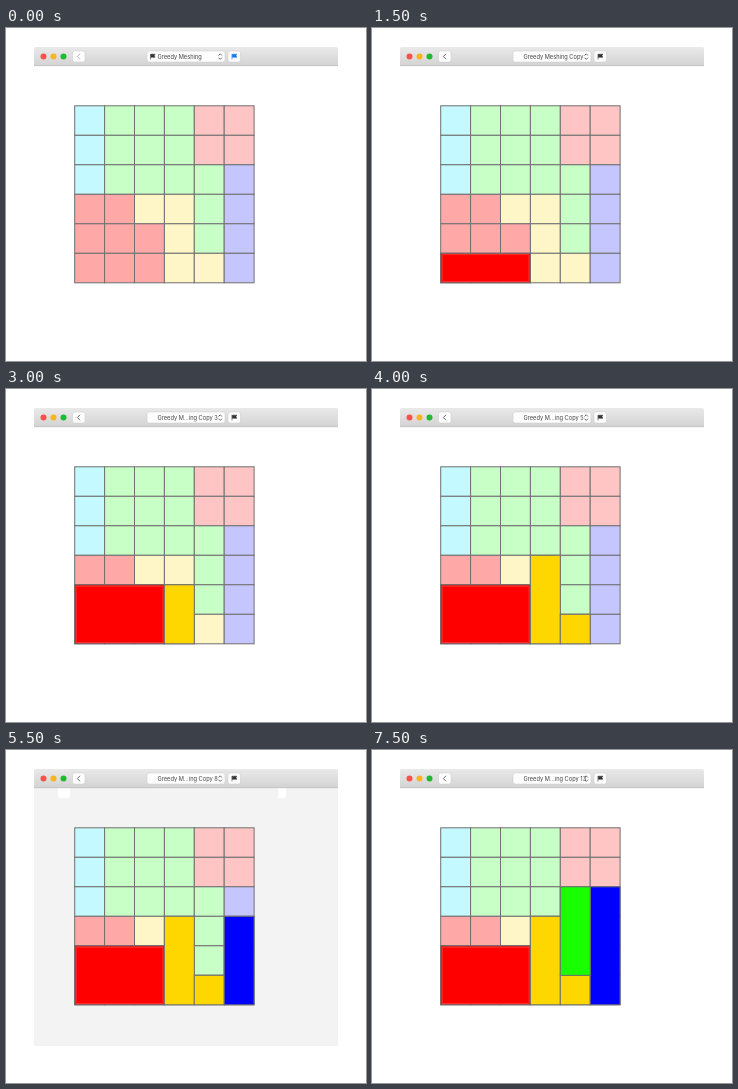
Write an HTML page that moves like this. It is 360 by 333 pixels and loops after 8 s.

```html
<!DOCTYPE html>
<html lang="en">
<head>
<meta charset="utf-8">
<title>Greedy Meshing</title>
<style>
  html, body { margin: 0; width: 100%; height: 100%; overflow: hidden; background: #fff; }
  svg { display: block; width: 360px; height: 333px; }
  text { font: 5.7px Inter, "Liberation Sans", sans-serif; fill: #444; }
  .button { fill: #fdfdfd; stroke: #c9c9c9; stroke-width: .5; }
  .line { fill: none; stroke: #444; stroke-width: .8; }
  .cell { stroke: #707070; stroke-width: 1; }
</style>
</head>
<body>
<svg viewBox="0 0 360 333">
  <defs>
    <linearGradient id="bar" x2="0" y2="1">
      <stop stop-color="#e9e9e9"/>
      <stop offset="1" stop-color="#d3d3d3"/>
    </linearGradient>
  </defs>
  <g id="shade" fill="#fff">
    <rect x="28" y="38" width="304" height="258" fill="#f3f3f3"/>
    <rect x="52" y="38" width="12" height="10"/>
    <rect x="272" y="38" width="8" height="10"/>
  </g>
  <path d="M28 38V21q0-2 2-2H330q2 0 2 2V38z" fill="url(#bar)"/>
  <path d="M28 37.7H332" stroke="#bdbdbd" stroke-width=".7"/>
  <circle cx="37.5" cy="28.5" r="3" fill="#f9524c"/>
  <circle cx="47.5" cy="28.5" r="3" fill="#f8b51c"/>
  <circle cx="57.5" cy="28.5" r="3" fill="#20b931"/>
  <rect class="button" x="66.5" y="23" width="12.5" height="11" rx="2"/>
  <path id="back" class="line" d="M74 25.8L71.4 28.5L74 31.2"/>
  <rect class="button" x="141" y="23" width="78" height="11" rx="2"/>
  <path id="titleFlag" d="M144.5 26V31.5M145 26.2h4l-.8 1.5l.8 1.5h-4z" fill="#333" stroke="#333" stroke-width=".6"/>
  <text id="title" x="151.5" y="30.6"></text>
  <path class="line" d="M212.5 27.5l1.7-1.7l1.7 1.7M212.5 29.7l1.7 1.7l1.7-1.7"/>
  <rect class="button" x="222" y="23" width="12.5" height="11" rx="2"/>
  <path id="flag" d="M226 26V31.5M226.4 26.2h4.4l-.9 1.5l.9 1.5h-4.4z" stroke-width=".6"/>
  <g id="cells"></g>
  <g id="meshes"></g>
</svg>
<script>
const STEP = 500, STEPS = 16;
const LEFT = 68.7, TOP = 77.8, CELL_W = 29.9, CELL_H = 29.5;
const PALE = { c: '#c4faff', g: '#c8ffc6', p: '#ffc5c5', b: '#c6c6ff', r: '#ffa8a8', y: '#fff6c8' };
const RED = '#ff0000', GOLD = '#ffd700', BLUE = '#0000ff', GREEN = '#17ff00';
const ROWS = ['cgggpp', 'cgggpp', 'cggggb', 'rryygb', 'rrrygb', 'rrryyb'];
const el = id => document.getElementById(id);

function box(col, row, cols, rows, fill) {
  const x = LEFT + col * CELL_W, y = TOP + row * CELL_H;
  return `<rect class="cell" x="${x}" y="${y}" width="${cols * CELL_W}" height="${rows * CELL_H}" fill="${fill}"/>`;
}

// A mesh one column wide, growing upwards from its bottom row.
const column = (col, bottom, height, fill) =>
  height > 0 ? box(col, bottom - height + 1, 1, height, fill) : '';

function redMesh(step) {
  if (step < 1) return '';
  const cols = Math.min(step, 3), rows = step > 3 ? 2 : 1;
  const x = LEFT + 1.4, y = TOP + (6 - rows) * CELL_H + 1.4;
  return box(0, 6 - rows, cols, rows, RED) +
    `<rect x="${x}" y="${y}" width="${cols * CELL_W - 2.8}" height="${rows * CELL_H - 2.8}" fill="none" stroke="#fff" stroke-opacity=".25" stroke-width=".7"/>`;
}

function titleAt(step) {
  if (step < 3) return 'Greedy Meshing';
  if (step < 5) return 'Greedy Meshing Copy';
  return 'Greedy M…ing Copy ' + (step < 12 ? step - 3 : step - 2);
}

function draw(step) {
  const first = step === 0;
  el('title').textContent = titleAt(step);
  el('titleFlag').style.opacity = first ? 1 : 0;
  el('back').style.stroke = first ? '#aaa' : '#444';
  el('flag').style.fill = el('flag').style.stroke = first ? '#1677e8' : '#333';
  el('shade').style.display = step === 11 ? '' : 'none';
  el('meshes').innerHTML = redMesh(step) +
    column(3, 5, Math.min(step - 4, 3), GOLD) +
    column(4, 5, Math.min(step - 7, 1), GOLD) +
    column(5, 5, Math.min(step - 8, 4), BLUE) +
    column(4, 4, Math.min(step - 12, 3), GREEN);
}

el('cells').innerHTML = ROWS.map((row, r) =>
  [...row].map((key, c) => box(c, r, 1, 1, PALE[key])).join('')).join('');

const start = performance.now();
let shown = -1;
function tick() {
  const step = Math.floor((performance.now() - start) / STEP) % STEPS;
  if (step !== shown) draw(shown = step);
  requestAnimationFrame(tick);
}
tick();
</script>
</body>
</html>
```
